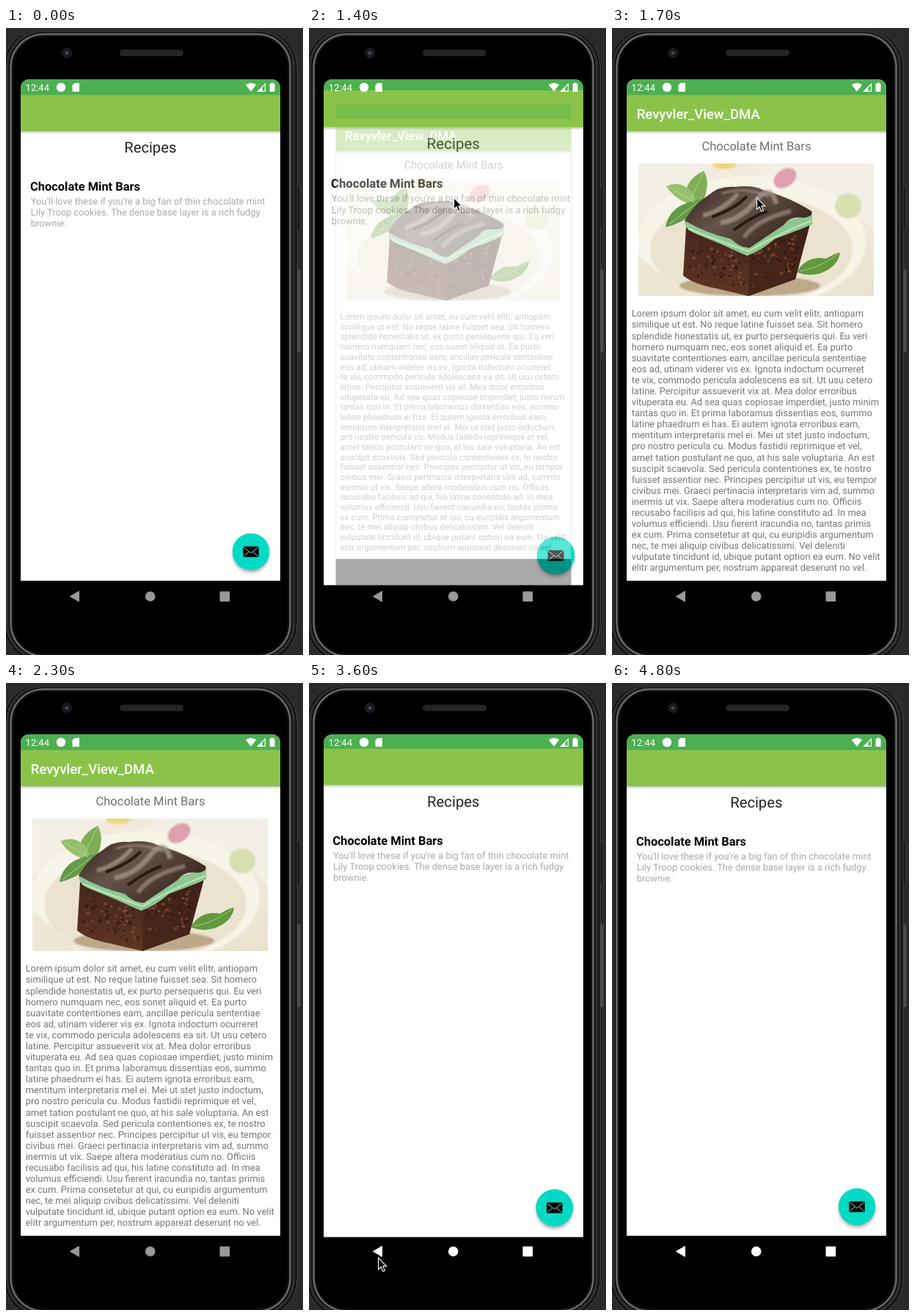
Write an HTML page that moves like this. It is 405 by 856 pixels and loops after 4.9 s.

```html
<!DOCTYPE html>
<html lang="en">
<head>
<meta charset="utf-8">
<title>Recipes</title>
<style>
html, body { margin: 0; width: 100%; height: 100%; overflow: hidden; background: #2a2a2b; }
svg { display: block; width: 405px; height: 856px; font-family: Roboto, sans-serif; text-rendering: geometricPrecision; }
text { white-space: pre; }
#list, #detail, #scrim, #ripple, #keys, #cursor { animation: 4900ms step-end infinite; }
#list, #detail { transform: scale(var(--zoom)); transform-origin: 197px 434px; }
#list { animation-name: list; }
#detail { animation-name: detail; opacity: var(--fade); }
#scrim { animation-name: scrim; }
#ripple { animation-name: ripple; }
#keys { animation-name: keys; }
#cursor { animation-name: cursor; }

@keyframes list {
  0% { --zoom: 1; }
  28.57% { --zoom: 1.0186; }
  30.61% { --zoom: 1.0447; }
  32.65% { --zoom: 1.05; }
  71.42% { --zoom: 1.0248; }
  73.46% { --zoom: 1.0055; }
  75.51% { --zoom: 1.0018; }
  77.55%, 100% { --zoom: 1; }
}
@keyframes detail {
  0% { --zoom: .85; --fade: 0; }
  28.57% { --zoom: .907; --fade: .33; }
  30.61% { --zoom: .983; --fade: 1; }
  32.65% { --zoom: .996; --fade: 1; }
  34.69% { --zoom: 1; --fade: 1; }
  71.42%, 100% { --zoom: .9; --fade: 0; }
}
@keyframes scrim {
  0% { fill-opacity: 0; }
  30.61% { fill-opacity: .25; }
  34.69%, 100% { fill-opacity: 0; }
}
@keyframes ripple {
  0% { fill-opacity: 0; }
  67.34% { fill-opacity: .5; }
  69.38% { fill-opacity: 1; }
  71.42% { fill-opacity: .6; }
  73.46%, 100% { fill-opacity: 0; }
}
@keyframes keys {
  0% { fill: #999; }
  67.34% { fill: #c8c8c8; }
  69.38% { fill: #f2f2f2; }
  71.42%, 100% { fill: #fff; }
}
@keyframes cursor {
  0% { visibility: hidden; transform: translate(255px, 212px); }
  6.12% { visibility: visible; transform: translate(255px, 212px); }
  8.16% { visibility: visible; transform: translate(236px, 219px); }
  10.2% { visibility: visible; transform: translate(216px, 226px); }
  12.24% { visibility: visible; transform: translate(202px, 230px); }
  14.28% { visibility: visible; transform: translate(197px, 231px); }
  40.81% { visibility: visible; transform: translate(250px, 330px); }
  42.85% { visibility: visible; transform: translate(298px, 545px); }
  44.89% { visibility: visible; transform: translate(166px, 765px); }
  46.93% { visibility: hidden; transform: translate(95px, 786px); }
  61.22% { visibility: visible; transform: translate(95px, 786px); }
  63.26% { visibility: visible; transform: translate(94px, 784px); }
  83.67% { visibility: visible; transform: translate(88px, 520px); }
  85.71% { visibility: visible; transform: translate(73px, 57px); }
  87.75% { visibility: visible; transform: translate(75px, 67px); }
  91.83% { visibility: visible; transform: translate(48px, -12px); }
  97.95%, 100% { visibility: hidden; transform: translate(48px, -12px); }
}
</style>
</head>
<body>
<svg viewBox="0 0 405 856">
  <defs>
    <clipPath id="screen"><path d="M20 798V82a12 12 0 0 1 12-12H362a12 12 0 0 1 12 12V798Z"/></clipPath>
    <clipPath id="frame"><rect x="36" y="185" width="321" height="181"/></clipPath>
    <linearGradient id="shade" x2="0" y2="1">
      <stop stop-color="#000" stop-opacity=".22"/>
      <stop offset="1" stop-color="#000" stop-opacity="0"/>
    </linearGradient>
    <linearGradient id="table" x2="1" y2="1">
      <stop stop-color="#efe7d8"/>
      <stop offset=".5" stop-color="#f4eee4"/>
      <stop offset="1" stop-color="#eadfcc"/>
    </linearGradient>
    <linearGradient id="icing" x2="1" y2=".6">
      <stop stop-color="#33231d"/>
      <stop offset=".45" stop-color="#66544c"/>
      <stop offset="1" stop-color="#38261f"/>
    </linearGradient>
    <linearGradient id="cake" x2="0" y2="1">
      <stop stop-color="#42231a"/>
      <stop offset="1" stop-color="#5f3524"/>
    </linearGradient>
    <pattern id="mesh" width="3" height="3" patternUnits="userSpaceOnUse">
      <rect width="3" height="3" fill="#2b2b2b"/>
      <circle cx="1.5" cy="1.5" r="1" fill="#141414"/>
    </pattern>
    <filter id="blur" x="-30%" y="-30%" width="160%" height="160%"><feGaussianBlur stdDeviation="2.5"/></filter>
    <filter id="soft"><feGaussianBlur stdDeviation="1.2"/></filter>
    <g id="bars">
      <rect x="20" y="70" width="354" height="728"/>
      <rect x="20" y="70" width="354" height="684.7" fill="#fff"/>
      <rect x="20" y="141" width="354" height="4" fill="url(#shade)"/>
      <rect x="20" y="70" width="354" height="71" fill="#8bc34a"/>
      <rect x="20" y="70" width="354" height="21.5" fill="#4caf50"/>
    </g>
  </defs>

  <!-- phone body -->
  <rect width="405" height="856" fill="#2a2a2b"/>
  <rect x="396" y="216" width="5" height="60" rx="1.5" fill="#1a1a1a" stroke="#444" stroke-width=".8"/>
  <rect x="396" y="330" width="5" height="112" rx="1.5" fill="#4a4a4b" stroke="#666" stroke-width=".6"/>
  <rect x="-3" y="1" width="400" height="865" rx="52" fill="#0d0d0e" stroke="#454547"/>
  <rect x="1.5" y="4" width="391" height="858" rx="49" fill="none" stroke="#2c2d2e" stroke-width="4"/>
  <rect x="6.500" y="8.500" width="381" height="849" rx="45" stroke="#66686a" stroke-width="2.600"/>
  <rect x="9" y="11" width="376" height="844" rx="43" stroke="#1c1c1d"/>
  <circle cx="83" cy="34" r="6.3" fill="#15191b" stroke="#24282a"/>
  <circle cx="83" cy="34" r="2.6" fill="#37474d"/>
  <rect x="155.5" y="30" width="86" height="8" rx="4" fill="url(#mesh)" stroke="#333" stroke-width=".6"/>

  <g clip-path="url(#screen)">
    <g id="list">
      <use href="#bars"/>
      <text x="196.8" y="170.3" font-size="20.2" text-anchor="middle" fill="#222">Recipes</text>
      <text x="33.1" y="222" font-size="16.4" font-weight="700">Chocolate Mint Bars</text>
      <g font-size="12.85" fill="#a9a9a9">
        <text x="33.8" y="240.8">You'll love these if you're a big fan of thin chocolate mint</text>
        <text x="33.8" y="255.9">Lily Troop cookies. The dense base layer is a rich fudgy</text>
        <text x="33.8" y="271">brownie.</text>
      </g>
      <circle cx="334" cy="718.5" r="24.5" opacity=".35" filter="url(#blur)"/>
      <circle cx="334" cy="715" r="25.3" fill="#03dac5"/>
      <rect x="323.3" y="707.8" width="21.4" height="14.4" rx="1.2"/>
      <path d="M324 708.8L334 717L344 708.8M324 721.4L331.3 715M344 721.4L336.7 715" fill="none" stroke="#9fe9df" stroke-width=".9"/>
    </g>
    <rect id="scrim" x="20" y="70" width="354" height="728" fill-opacity="0"/>

    <g id="detail">
      <use href="#bars"/>
      <text x="33.800" y="124" font-size="18.550" font-weight="500" fill="#fff">Revyvler_View_DMA</text>
      <text x="197" y="166.800" font-size="16.500" text-anchor="middle" fill="#707070">Chocolate Mint Bars</text>
      <g clip-path="url(#frame)">
        <g filter="url(#soft)">
          <rect x="26" y="175" width="341" height="201" fill="url(#table)"/>
          <path d="M26 175H150L60 250L26 268Z" fill="#f4efe5"/>
          <path d="M205 175H367V285Q300 215 205 205Z" fill="#f3eee6"/>
          <ellipse cx="190" cy="292" rx="156" ry="90" fill="#f8f4ea"/>
          <ellipse cx="190" cy="302" rx="138" ry="74" fill="#ece2d0"/>
          <path d="M26 300Q76 352 150 376H26Z" fill="#efe6d6"/>
          <ellipse cx="153" cy="187" rx="16" ry="6" fill="#f0d67c"/>
          <ellipse cx="236" cy="205" rx="17" ry="12" fill="#dfa0ae" transform="rotate(-35 236 205)"/>
          <ellipse cx="322" cy="243" rx="18" ry="17" fill="#d8dfb0"/>
          <ellipse cx="188" cy="352" rx="96" ry="14" fill="#bda88a"/>
        </g>
        <path d="M102 240Q94 210 125 195Q136 214 122 240Z" fill="#7fae55"/>
        <path d="M74 216Q92 208 108 222L118 242Q90 240 74 216Z" fill="#95c06d"/>
        <path d="M73 272Q78 240 122 234Q112 262 73 272Z" fill="#649a48"/>
        <path d="M106 236L124 198M78 268L116 238M78 217L112 238" fill="none" stroke="#b4d58e"/>
        <path d="M101 272L97 338Q112 350 140 355L186 366L250 343L271 264L190 282Z" fill="url(#cake)"/>
        <path d="M188 298L186 366L250 343L271 264Z" fill="#3f2016" opacity=".7"/>
        <g id="crumbs"></g>
        <path d="M99 262Q98 274 112 280Q148 294 184 311Q204 304 222 288Q250 278 273 268L273 254L190 276Z" fill="#8cc690"/>
        <path d="M104 274Q150 292 186 305Q220 284 272 263" fill="none" stroke="#b9e0b4" stroke-width="2.500"/>
        <path d="M99 263Q112 240 132 228Q146 215 168 217Q192 214 206 221Q244 232 272 250Q275 257 262 259Q242 256 234 269Q212 284 188 300Q176 301 162 288Q128 280 99 263Z" fill="url(#icing)"/>
        <g fill="none" stroke="#a89a92" filter="url(#soft)">
          <path d="M124 256Q150 250 172 226" stroke-width="6" opacity=".7"/>
          <path d="M148 266Q176 262 196 236T224 240" stroke-width="7" opacity=".7"/>
          <path d="M180 286Q196 262 244 250" stroke-width="6" opacity=".6"/>
          <path d="M150 226Q180 216 214 230" stroke-width="3" opacity=".6"/>
        </g>
        <path d="M136 258Q166 248 184 230M166 276Q190 258 212 250" fill="none" stroke="#2a1a15" stroke-width="4"/>
        <path d="M252 333Q266 310 292 315Q306 306 311 307Q308 326 284 335Q266 340 252 333Z" fill="#62983e"/>
        <path d="M256 332Q282 328 308 309" fill="none" stroke="#a8cd7c"/>
      </g>
      <g id="body" font-size="12.880" fill="#757575"></g>
    </g>

    <!-- status bar -->
    <g fill="#fff">
      <text x="26.600" y="85.600" font-size="13">12:44</text>
      <circle cx="75" cy="81" r="6.200"/>
      <path d="M93.600 75H99a1 1 0 0 1 1 1V86a1 1 0 0 1-1 1H91.500a1 1 0 0 1-1-1V78.300Z"/>
      <path d="M326.800 77.500Q334 72.500 341.200 77.500L334 86.800Z"/>
      <path d="M354 75V87H342ZM352.800 78L349.500 81.300V85.800H352.800Z" fill-rule="evenodd"/>
      <path d="M361.300 74.800H364.700V76H366.500V87H359.500V76H361.300Z"/>
    </g>
  </g>

  <!-- navigation keys -->
  <rect id="ripple" x="49" y="755" width="90.500" height="43" rx="20" fill="#262626" fill-opacity="0"/>
  <g id="keys" fill="#999">
    <path d="M86.700 776L99 768.700Q100 768.300 100 769.300V782.700Q100 783.700 99 783.300Z"/>
    <circle cx="196.700" cy="776" r="6.800"/>
    <rect x="291.500" y="769.300" width="13.600" height="13.600" rx="1"/>
  </g>

  <path id="cursor" visibility="hidden" d="M.6 .8V16.500L4.200 13L6.700 19.300L9.400 18.200L6.900 12.100H11.600Z" stroke="#fff" stroke-width="1.1"/>
</svg>
<script>
const lines = `Lorem ipsum dolor sit amet, eu cum velit elitr, antiopam
similique ut est. No reque latine fuisset sea. Sit homero
splendide honestatis ut, ex purto persequeris qui. Eu veri
homero numquam nec, eos sonet aliquid et. Ea purto
suavitate contentiones eam, ancillae pericula sententiae
eos ad, utinam viderer vis ex. Ignota indoctum ocurreret
te vix, commodo pericula adolescens ea sit. Ut usu cetero
latine. Percipitur assueverit vix at. Mea dolor erroribus
vituperata eu. Ad sea quas copiosae imperdiet, justo minim
tantas quo in. Et prima laboramus dissentias eos, summo
latine phaedrum ei has. Ei autem ignota erroribus eam,
mentitum interpretaris mel ei. Mei ut stet justo indoctum,
pro nostro pericula cu. Modus fastidii reprimique et vel,
amet tation postulant ne quo, at his sale voluptaria. An est
suscipit scaevola. Sed pericula contentiones ex, te nostro
fuisset assentior nec. Principes percipitur ut vis, eu tempor
civibus mei. Graeci pertinacia interpretaris vim ad, summo
inermis ut vix. Saepe altera moderatius cum no. Officiis
recusabo facilisis ad qui, his latine constituto ad. In mea
volumus efficiendi. Usu fierent iracundia no, tantas primis
ex cum. Prima consetetur at qui, cu euripidis argumentum
nec, te mei aliquip civibus delicatissimi. Vel deleniti
vulputate tincidunt id, ubique putant option ea eum. No velit
elitr argumentum per, nostrum appareat deserunt no vel.`.split("\n");
document.getElementById("body").innerHTML = lines
  .map((line, i) => `<text x="26.7" y="${394.4 + i * 15.09}">${line}</text>`)
  .join("");

// Speckled crumb on the two cut faces
let seed = 7;
const random = () => (seed = (seed * 16807) % 2147483647) / 2147483647;
const crumb = (_, i) => {
  const u = random(), v = random(), left = i % 2;
  const x = left ? 102 + u * 82 : 192 + u * 62;
  const y = left ? 288 + u * 22 + v * 48 : 308 - u * 28 + v * 48;
  const tone = random() < .5 ? "#87533b" : "#2e160e";
  return `<circle cx="${x}" cy="${y}" r="${.8 + random() * 1.6}" fill="${tone}" opacity=".7"/>`;
};
document.getElementById("crumbs").innerHTML = Array.from({ length: 140 }, crumb).join("");
</script>
</body>
</html>
```
